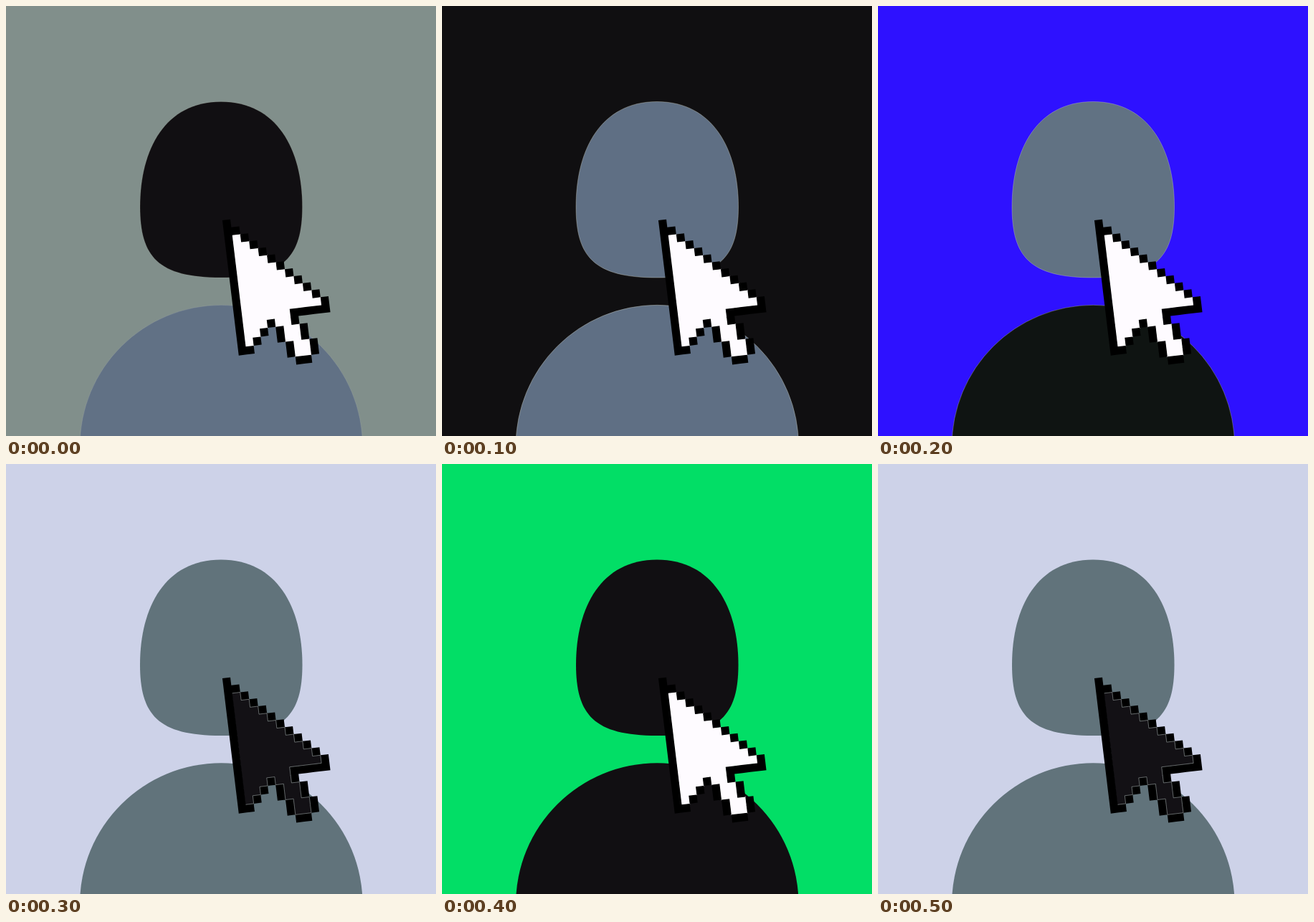
An HTML page with a canvas for the animation above (0.6 s loop, 600x600 px).

```html
<!DOCTYPE html>
<html lang="en">
<head>
<meta charset="utf-8">
<title>Profile and pointer</title>
<style>
  html, body { margin: 0; width: 100%; height: 100%; overflow: hidden; }
  canvas { display: block; width: 100%; height: 100%; }
</style>
</head>
<body>
<canvas id="stage" width="600" height="600"></canvas>
<script>
const ctx = document.getElementById("stage").getContext("2d");
const STEP = 100;

const INK = "#110f12", PAPER = "#fefbff", SLATE = "#61737b";
const pale = { bg: "#cdd2e8", head: SLATE, body: SLATE, pointer: "#131115", rim: 0 };
const looks = [
  { bg: "#818f8b", head: INK, body: "#617185", pointer: PAPER, rim: 0.15 },
  { bg: "#100f11", head: "#5f6f84", body: "#5f6f84", pointer: PAPER, rim: 0.35 },
  { bg: "#2e11ff", head: "#617283", body: "#0f1412", pointer: PAPER, rim: 0.3 },
  pale,
  { bg: "#02de66", head: INK, body: INK, pointer: PAPER, rim: 0 },
  pale
];

const head = new Path2D(
  "M300 133.500C222 133.500 187 200 187 280C187 350 212 379 300 379" +
  "C388 379 413.500 350 413.500 280C413.500 200 378 133.500 300 133.500Z");
const body = new Path2D();
body.ellipse(300.3, 614, 197.3, 196.7, 0, 0, Math.PI * 2);

// Pointer bitmap: X is outline, dot is inside
const bitmap = [
  "X",
  ...Array.from({ length: 11 }, (_, i) => "X" + ".".repeat(i) + "X"),
  "X......XXXXX",
  "X...X..X",
  "X..X X..X",
  "X.X  X..X",
  "XX    X..X",
  "      X..X",
  "       XX"
];
const CELL = 11.18, TILT = -0.1206;
const outline = new Path2D(), inside = new Path2D(), seams = new Path2D();
const isInk = (c, r) => c > 0 && bitmap[r][c] === "X";

function seam(x1, y1, x2, y2) {
  seams.moveTo(x1, y1);
  seams.lineTo(x2, y2);
}

bitmap.forEach((row, r) => [...row].forEach((mark, c) => {
  if (mark === "X") outline.rect(c, r, 1, 1);
  if (mark !== ".") return;
  inside.rect(c - 0.05, r - 0.05, 1.1, 1.1);
  if (isInk(c - 1, r)) seam(c, r, c, r + 1);
  if (isInk(c + 1, r)) seam(c + 1, r, c + 1, r + 1);
  if (isInk(c, r - 1)) seam(c, r, c + 1, r);
  if (isInk(c, r + 1)) seam(c, r + 1, c + 1, r + 1);
}));

function fill(path, color) {
  ctx.fillStyle = color;
  ctx.fill(path);
}

function figure(path, color, rim) {
  fill(path, color);
  if (!rim) return;
  ctx.lineWidth = 1;
  ctx.strokeStyle = `rgba(225, 225, 205, ${rim})`;
  ctx.stroke(path);
}

function pointer(color) {
  ctx.save();
  ctx.translate(301.9, 299);
  ctx.rotate(TILT);
  ctx.scale(CELL, CELL);
  fill(inside, color);
  fill(outline, "#000");
  if (color !== PAPER) {
    ctx.lineWidth = 0.07;
    ctx.strokeStyle = "rgba(190, 200, 200, 0.6)";
    ctx.stroke(seams);
  }
  ctx.restore();
}

function draw(now) {
  const look = looks[Math.floor(now / STEP) % looks.length];
  ctx.fillStyle = look.bg;
  ctx.fillRect(0, 0, 600, 600);
  figure(head, look.head, look.rim);
  figure(body, look.body, look.rim);
  pointer(look.pointer);
  requestAnimationFrame(() => draw(performance.now()));
}
draw(performance.now());
</script>
</body>
</html>
```
